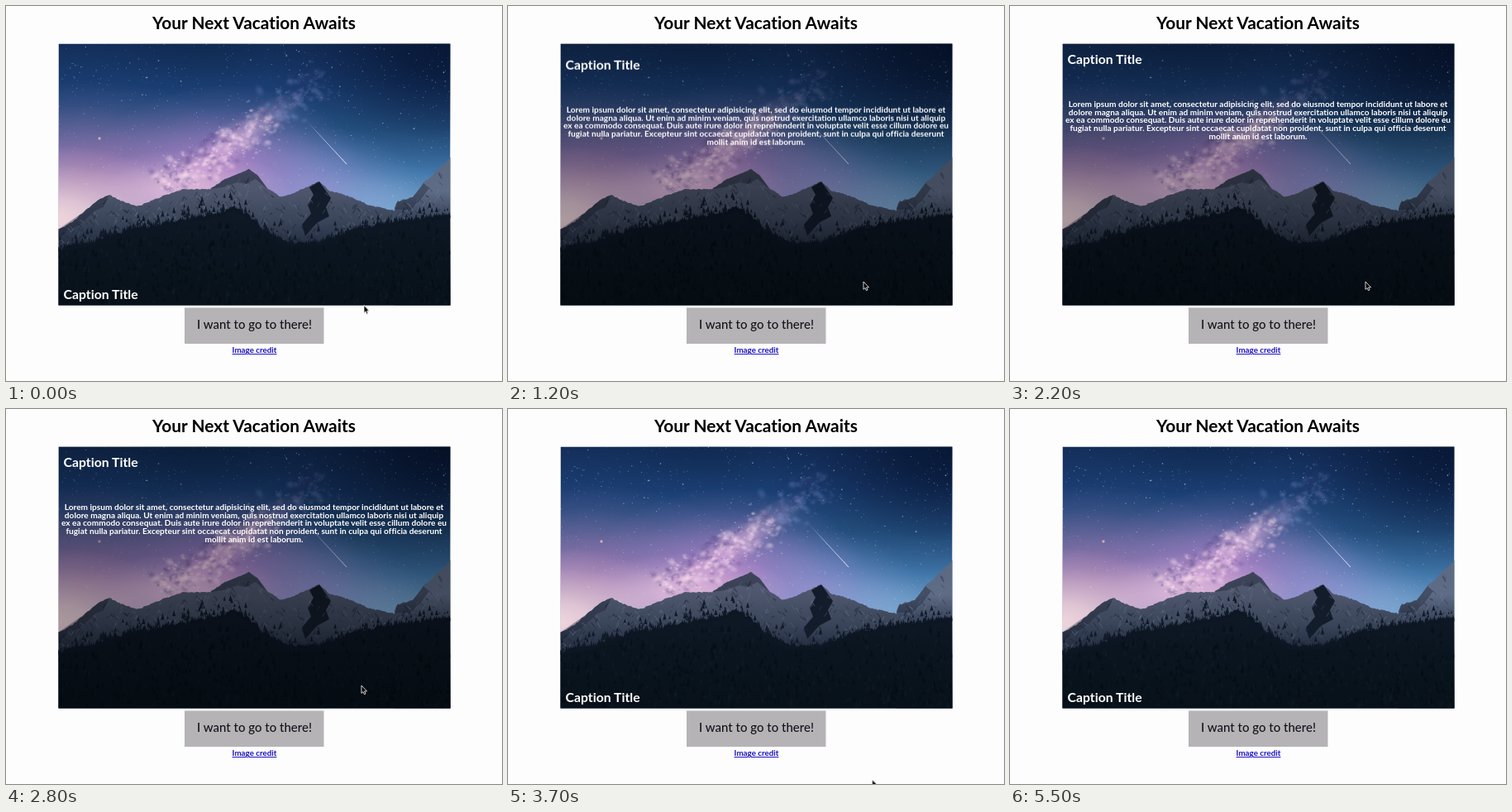
Animation of 600x453 px, one loop 5.6 s. Source, as an HTML page with a canvas:

```html
<!DOCTYPE html>
<html lang="en">
<head>
<meta charset="utf-8">
<title>Your Next Vacation Awaits</title>
<style>
  html, body { margin: 0; width: 100%; height: 100%; overflow: hidden; background: #fefdfe; }
  canvas, svg.stage { position: absolute; left: 0; top: 0; }
  text { font-family: Lato, sans-serif; font-variant-ligatures: none; }
  .mid { text-anchor: middle; }
  .bold { font-weight: 700; }
  .title { font-size: 20.9px; }
  .heading { font-size: 15.8px; fill: #fff; }
  .body { font-size: 10.15px; fill: #fff; }
  .action { font-size: 15px; font-weight: 500; fill: #14141c; }
  .credit { font-size: 9.8px; fill: #1a12c4; text-decoration: underline; }
  .shade { animation: dim 5.6s infinite; }
  .caption { animation: slide 5.6s infinite; }
  .cursor { animation: point 5.6s linear infinite; }

  @keyframes slide {
    0%, 14.29% { transform: translateY(284px); animation-timing-function: ease; }
    23.2%, 54.5% { transform: translateY(0); animation-timing-function: ease; }
    63.4%, 100% { transform: translateY(284px); }
  }
  @keyframes dim {
    0%, 14.29% { opacity: 0; animation-timing-function: ease; }
    23.2%, 54.5% { opacity: .28; animation-timing-function: ease; }
    63.4%, 100% { opacity: 0; }
  }
  @keyframes point {
    0%, 10.7% { transform: translate(433px, 361.5px); }
    14.29%, 44.6% { transform: translate(430px, 333px); }
    50% { transform: translate(430px, 334px); animation-timing-function: ease-in-out; }
    62.5% { transform: translate(440px, 446px); }
    66.07% { transform: translate(440.5px, 447.5px); }
    67.86% { transform: translate(442px, 456px); }
    76.8% { transform: translate(558px, 456px); }
    80.36% { transform: translate(561px, 435px); }
    84%, 100% { transform: translate(561px, 456px); }
  }
</style>
</head>
<body>
<canvas id="photo" width="600" height="453"></canvas>
<svg class="stage" width="600" height="453">
  <text class="title bold mid" x="300" y="28">Your Next Vacation Awaits</text>
  <rect class="shade" x="63.5" y="45.5" width="474" height="316"/>
  <svg x="64" y="45" width="473" height="316" overflow="hidden">
    <g class="caption">
      <text class="heading bold" x="5.5" y="25">Caption Title</text>
      <g class="body bold mid">
        <text x="236" y="77">Lorem ipsum dolor sit amet, consectetur adipisicing elit, sed do eiusmod tempor incididunt ut labore et</text>
        <text x="236" y="86.7">dolore magna aliqua. Ut enim ad minim veniam, quis nostrud exercitation ullamco laboris nisi ut aliquip</text>
        <text x="236" y="96.4">ex ea commodo consequat. Duis aute irure dolor in reprehenderit in voluptate velit esse cillum dolore eu</text>
        <text x="236" y="106.1">fugiat nulla pariatur. Excepteur sint occaecat cupidatat non proident, sunt in culpa qui officia deserunt</text>
        <text x="236" y="115.8">mollit anim id est laborum.</text>
      </g>
    </g>
  </svg>
  <rect x="216" y="364.5" width="168.5" height="43.5" fill="#b5b3b6"/>
  <text class="action mid" x="300.5" y="390">I want to go to there!</text>
  <text class="credit bold mid" x="300.5" y="419">Image credit</text>
  <path class="cursor" d="M0 0V9.4L2 7.5 3.4 10.7 5 10 3.6 6.9H6.5Z" stroke="#fff" stroke-width=".8"/>
</svg>
<script>
  const ctx = document.getElementById('photo').getContext('2d');
  const LEFT = 63.5, TOP = 45.5, RIGHT = 537.5, BOTTOM = 361.5;

  let seed = 7;
  const rand = () => (seed = (seed * 16807) % 2147483647) / 2147483647;
  const spread = () => rand() + rand() + rand() - 1.5;
  const points = text => text.split(' ').map(pair => pair.split(',').map(Number));

  function vertical(y0, y1, colors) {
    const fill = ctx.createLinearGradient(0, y0, 0, y1);
    colors.forEach((color, i) => fill.addColorStop(i / (colors.length - 1), color));
    return fill;
  }

  function glow(x, y, rx, ry, rgb, alpha, angle = 0) {
    const fill = ctx.createRadialGradient(0, 0, 0, 0, 0, 1);
    [1, 0.82, 0.5, 0.18, 0].forEach((k, i) => fill.addColorStop(i / 4, `rgba(${rgb},${alpha * k})`));
    ctx.save();
    ctx.translate(x, y);
    ctx.rotate(angle);
    ctx.scale(rx, ry);
    ctx.fillStyle = fill;
    ctx.fillRect(-1, -1, 2, 2);
    ctx.restore();
  }

  function shape(outline, fill) {
    ctx.beginPath();
    outline.forEach(([x, y]) => ctx.lineTo(x, y));
    ctx.closePath();
    ctx.fillStyle = fill;
    ctx.fill();
  }

  function heightAt(line, x) {
    const i = Math.max(1, line.findIndex(p => p[0] >= x));
    const [x0, y0] = line[i - 1], [x1, y1] = line[i];
    return y0 + (y1 - y0) * (x - x0) / (x1 - x0);
  }

  function rough(line, amount) {
    const result = [];
    for (let x = line[0][0]; x <= 538; x += 2) {
      result.push([x, heightAt(line, x) + (rand() - 0.5) * amount]);
    }
    return result;
  }

  const toGround = line => [...line, [538, 362], [line[0][0], 362]];

  function tree(x, y, size, color) {
    shape([[x - size * 0.28, y], [x, y - size], [x + size * 0.28, y]], color);
  }

  function drawSky() {
    ctx.fillStyle = vertical(TOP, 250, ['#142e59', '#1a3d71', '#265384', '#4075a8', '#6f9fc6']);
    ctx.fillRect(LEFT, TOP, RIGHT - LEFT, BOTTOM - TOP);
    glow(95, 210, 215, 120, '165,115,172', 0.88);
    glow(265, 200, 165, 105, '178,128,198', 0.9);
    glow(380, 230, 120, 85, '165,152,216', 0.65);
    glow(455, 243, 95, 55, '130,172,216', 0.55);
    glow(60, 258, 170, 90, '245,218,222', 0.95);
    glow(215, 222, 130, 48, '240,200,224', 0.75);
    glow(535, 50, 225, 150, '6,20,48', 0.85);
    glow(240, 40, 150, 60, '12,38,74', 0.5);

    // Milky way: puffs scattered along a rising diagonal
    glow(270, 168, 115, 24, '232,185,225', 0.6, -0.61);
    for (let i = 0; i < 620; i++) {
      const along = rand(), off = spread() * 26;
      const x = 190 + along * 200 + off * 0.57;
      const y = 222 - along * 138 + off * 0.82;
      const dark = rand() < (off < -2 ? 0.55 : 0.25);
      const rgb = dark ? '80,65,130' : along > 0.65 ? '135,150,205' : '252,222,238';
      const alpha = (dark ? 0.32 : 0.5) * (1.1 - along * 0.85);
      const size = 1.5 + rand() * rand() * 9;
      glow(x, y, size, size * 0.7, rgb, alpha, spread());
    }

    for (let i = 0; i < 800; i++) {
      const size = rand() < 0.06 ? 1.4 : 0.5 + rand() * 0.5;
      ctx.fillStyle = `rgba(205,220,250,${0.2 + rand() * 0.5})`;
      ctx.fillRect(LEFT + rand() * 474, TOP + rand() * 200, size, size);
    }
    glow(113, 160, 2.5, 2.5, '255,190,190', 1);

    const trail = ctx.createLinearGradient(363, 138, 412, 191);
    trail.addColorStop(0, 'rgba(220,215,245,0)');
    trail.addColorStop(0.4, 'rgba(220,215,245,.6)');
    trail.addColorStop(1, '#e8e6fa');
    ctx.strokeStyle = trail;
    ctx.lineWidth = 1;
    ctx.beginPath();
    ctx.moveTo(363, 138);
    ctx.lineTo(412, 191);
    ctx.stroke();
  }

  function drawLand() {
    const ridge = points('63,270 80,261 95,248 112,234 125,228 135,234 160,242 178,234 197,227 215,221 247,221 265,209 283,202 294,197 304,204 315,219 333,231 350,225 365,218 379,212 391,223 415,230 440,241 468,247 538,252');
    const cliff = points('470,245 473,236 481,234 492,231 505,214 520,200 538,183');
    const forest = points('63,293 105,285 150,270 200,262 240,254 262,249 276,243 292,252 310,270 338,286 380,286 420,270 460,262 500,257 538,252');

    shape(toGround(rough(ridge, 1.5)), vertical(198, 290, ['#565d74', '#4b546a', '#3b455a', '#232d3f']));
    shape(toGround(rough(cliff, 2)), vertical(185, 262, ['#5b6881', '#5f6c86', '#303c51']));

    // Shaded faces
    const shade = 'rgba(24,31,48,.38)';
    shape(points('125,228 112,234 95,248 63,270 63,280 92,262 108,247 118,243'), shade);
    shape(points('294,197 283,202 265,209 247,221 262,219 280,213 290,215 302,209 315,220 304,204'), shade);
    shape(points('505,214 492,231 473,237 471,246 490,246 503,232 512,220'), shade);
    shape(points('379,212 367,219 372,228 365,240 369,251 358,264 362,278 376,262 391,254 387,243 393,232'), '#131c2b');

    // Rock streaks
    for (let i = 0; i < 320; i++) {
      const x = 66 + rand() * 468;
      const base = x > 472 ? cliff : ridge;
      const top = heightAt(base, x), low = heightAt(forest, x);
      const y = top + 3 + rand() * Math.max(0, low - top - 5);
      const lean = rand() < 0.5 ? -3 : 4;
      ctx.strokeStyle = rand() < 0.55 ? 'rgba(20,27,42,.42)' : 'rgba(132,142,166,.25)';
      ctx.lineWidth = 0.6 + rand();
      ctx.beginPath();
      ctx.moveTo(x, y);
      ctx.lineTo(x + lean, y + 2 + rand() * 5);
      ctx.stroke();
    }

    // Lone trees thicken toward the forest edge
    for (let i = 0; i < 230; i++) {
      const x = LEFT + rand() * 474;
      const y = heightAt(forest, x) + 3 - rand() * rand() * 22;
      tree(x, y, 3 + rand() * 5, '#111b29');
    }

    shape(toGround(rough(forest, 5)), vertical(250, BOTTOM, ['#0f1825', '#0b1520', '#09131c', '#08111a']));
    for (let x = LEFT; x < RIGHT; x += 2.5) {
      tree(x, heightAt(forest, x) + 4, 4 + rand() * 6, '#0d1723');
    }
    for (let i = 0; i < 750; i++) {
      const x = LEFT + rand() * 474;
      const y = 268 + rand() * 93;
      if (y > heightAt(forest, x) + 9) {
        tree(x, y, 3 + rand() * 6, rand() < 0.5 ? 'rgba(28,42,54,.2)' : 'rgba(3,9,15,.4)');
      }
    }
  }

  ctx.beginPath();
  ctx.rect(LEFT, TOP, RIGHT - LEFT, BOTTOM - TOP);
  ctx.clip();
  drawSky();
  drawLand();
</script>
</body>
</html>
```
